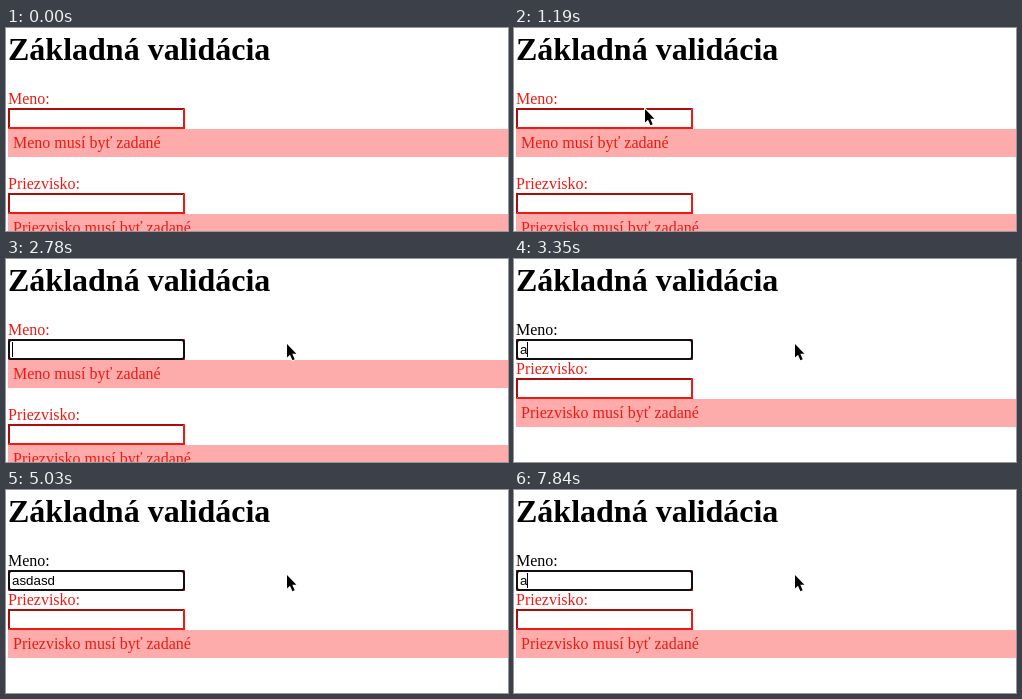
These frames come from a looping animation (502x203 px, 8 s). An HTML page:

```html
<!DOCTYPE html>
<html lang="sk">
<head>
<meta charset="utf-8">
<style>
  html, body { margin: 0; width: 100%; height: 100%; overflow: hidden; background: #fff; }
  svg { display: block; width: 502px; height: 203px; }
  text { font: 16px "Liberation Serif", "Times New Roman", serif; white-space: pre; }
  .title { font-size: 32px; font-weight: bold; }
  .typed { font: 13.333px "Liberation Sans", Arial, sans-serif; }
  .invalid { fill: #ee1a12; }
  .alert { fill: #fdabab; }
</style>
</head>
<body>
<svg viewBox="0 0 502 203">
  <text class="title" x="2" y="32">Základná validácia</text>
  <g id="first"></g>
  <g id="second"></g>
  <rect id="ring" x="3" y="81" width="175" height="19" rx="2.5" fill="#fff" stroke="#101010" stroke-width="2"/>
  <text id="typed" class="typed" x="6" y="95"></text>
  <rect id="caret" y="83" width="1" height="15"/>
  <path id="cursor" d="M0 0V13.5L3 10.7L5.4 16.3L7.7 15.3L5.3 9.8H9.4Z" stroke="#fff" stroke-width="2" paint-order="stroke"/>
</svg>
<script>
const LOOP = 8000, BLINK = 560, FOCUS = 1660, FILLED = 3280;
const $ = id => document.getElementById(id);

// Every field is laid out from the top edge of its input.
function field(name) {
  return `<text class="label invalid" x="2" y="76">${name}:</text>
    <path fill="#a80f0c" d="M2 80H179L177 82H4V99L2 101Z"/>
    <path fill="#ee1a12" d="M179 80V101H2L4 99H177V82Z"/>
    <g class="error">
      <rect class="alert" x="2" y="101" width="500" height="28"/>
      <text class="invalid" x="7" y="120">${name} musí byť zadané</text>
    </g>`;
}
$('first').innerHTML = field('Meno');
$('second').innerHTML = field('Priezvisko');
const label = $('first').querySelector('.label');
const error = $('first').querySelector('.error');

// [time, length of the typed word]
const keys = [[FILLED, 1], [3700, 2], [3980, 3], [4190, 4], [4330, 5], [4470, 6],
              [6300, 5], [6580, 4], [6860, 3], [7140, 2], [7630, 1]];
const LAST_TYPED = 4470;

// The pointer jumps in evenly timed steps along each move.
const moves = [
  { start: 700, step: 70, count: 8, from: [406, 190], to: [131, 81] },
  { start: 1540, step: 67.5, count: 9, from: [131, 81], to: [74, 88] },
  { start: 2360, step: 70, count: 4, from: [74, 88], to: [281, 85] }
];

const show = (el, on) => el.setAttribute('visibility', on ? 'visible' : 'hidden');

function pointerAt(t) {
  const m = moves.filter(m => t >= m.start).pop();
  if (!m) return null;
  const p = Math.min(1, (Math.floor((t - m.start) / m.step) + 1) / m.count);
  const e = 1 - (1 - p) ** 2;
  return m.from.map((a, i) => Math.round(a + (m.to[i] - a) * e));
}

function caretOn(t) {
  if (t < FOCUS) return false;
  if (t >= FILLED && t < LAST_TYPED) return true;
  const since = t < FILLED ? FOCUS : LAST_TYPED;
  return Math.floor((t - since) / BLINK) % 2 === 0;
}

function draw(t) {
  const key = keys.filter(k => t >= k[0]).pop();
  const filled = t >= FILLED;
  $('typed').textContent = 'asdasd'.slice(0, key ? key[1] : 0);
  label.classList.toggle('invalid', !filled);
  show(error, !filled);
  $('second').setAttribute('transform', `translate(0 ${filled ? 39 : 85})`);

  show($('ring'), t >= FOCUS);
  const width = key ? $('typed').getComputedTextLength() : 0;
  $('caret').setAttribute('x', Math.round(6 + width));
  show($('caret'), caretOn(t));

  const tip = pointerAt(t);
  show($('cursor'), tip);
  if (tip) $('cursor').setAttribute('transform', `translate(${tip})`);
}

const begin = performance.now();
function tick() {
  draw((performance.now() - begin) % LOOP);
  requestAnimationFrame(tick);
}
tick();
</script>
</body>
</html>
```
